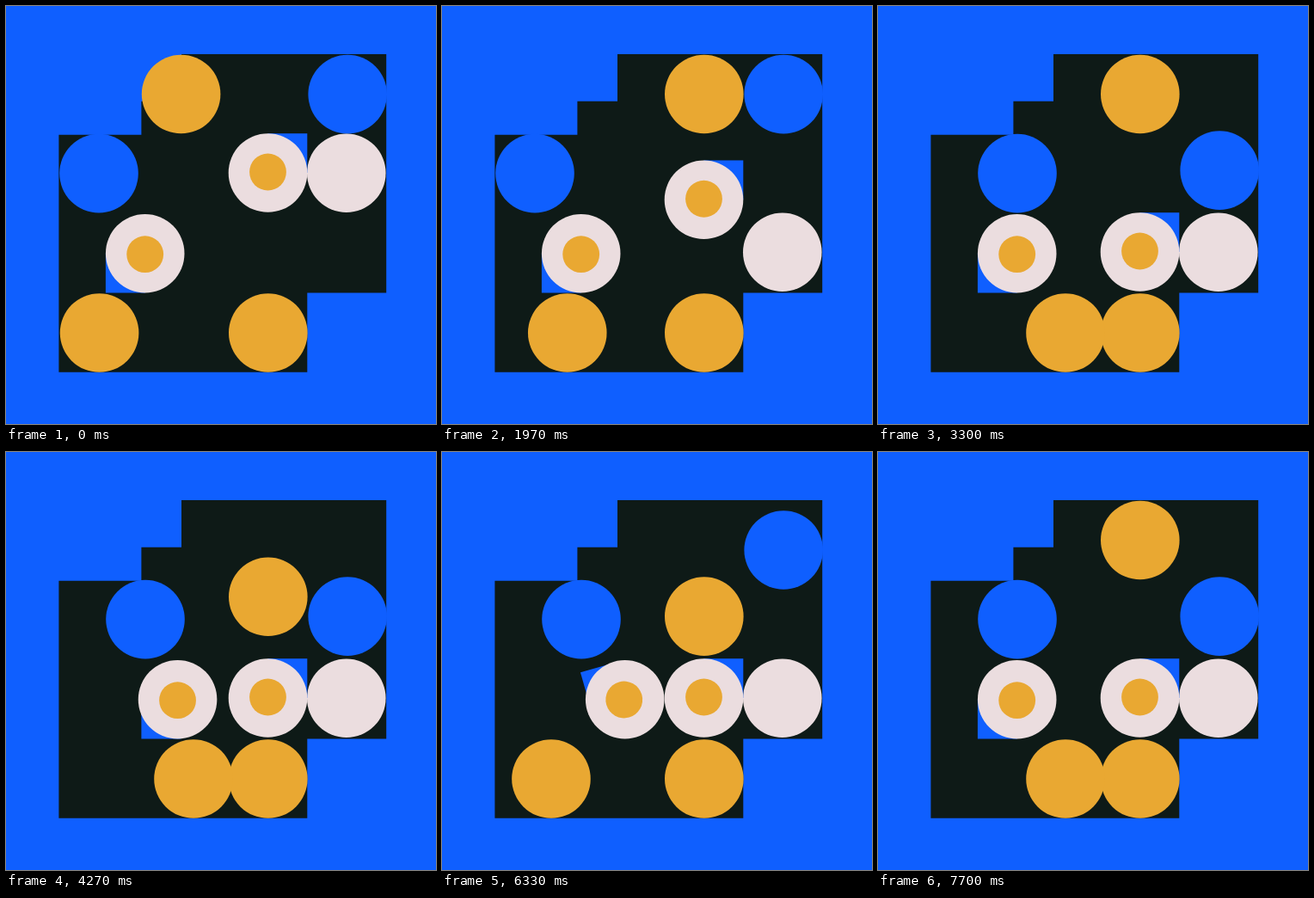
An HTML page with a canvas that plays this animation: 500x486 px, repeating every 8 s.

```html
<!DOCTYPE html>
<html lang="en">
<head>
<meta charset="utf-8">
<title>Sliding circles</title>
<style>
  html, body { margin: 0; width: 100%; height: 100%; overflow: hidden; background: #0f5fff; }
  canvas { display: block; }
</style>
</head>
<body>
<canvas id="stage" width="500" height="486"></canvas>
<script>
const ctx = document.getElementById('stage').getContext('2d');
const BLUE = '#0f5fff', DARK = '#0e1a17', YELLOW = '#e9a832', PALE = '#ebdddf';
const LOOP = 8000, FIRST_MOVE = 830, MOVE_GAP = 1100, STEPS = 9;
const RADIUS = 45.8, YOLK = 21.4;

// cubic-bezier(0, 0, .58, 1), solved by bisection
function easeOut(x) {
  let low = 0, high = 1;
  for (let i = 0; i < 30; i++) {
    const mid = (low + high) / 2;
    if (1.74 * mid ** 2 - 0.74 * mid ** 3 < x) low = mid; else high = mid;
  }
  return 3 * low ** 2 - 2 * low ** 3;
}

// Eased progress of move n, stepped at 30 frames a second on a 10 ms clock
function progress(n, time) {
  const elapsed = time - FIRST_MOVE - n * MOVE_GAP;
  if (elapsed < 0) return 0;
  const step = Math.floor(3 * Math.floor(elapsed / 10) / 10) + 1;
  return step >= STEPS ? 1 : easeOut(step / STEPS);
}

function circle(x, y, color, radius = RADIUS) {
  ctx.fillStyle = color;
  ctx.beginPath();
  ctx.arc(x, y, radius, 0, 2 * Math.PI);
  ctx.fill();
}

function board() {
  ctx.fillStyle = BLUE;
  ctx.fillRect(0, 0, 500, 486);
  ctx.fillStyle = DARK;
  ctx.beginPath();
  [[204, 56], [442.2, 56], [442.2, 333.6], [350.3, 333.6], [350.3, 425.8],
   [61.4, 425.8], [61.4, 149.8], [157.4, 149.8], [157.4, 110.7], [204, 110.7]]
    .forEach(([x, y]) => ctx.lineTo(x, y));
  ctx.fill();
}

// A disc with a yolk and one blue corner; side is -1 for lower left, 1 for upper right
function egg(x, y, side, turn = 0, cornerShift = 0) {
  ctx.save();
  ctx.translate(x + cornerShift, y);
  ctx.rotate(turn);
  ctx.fillStyle = BLUE;
  ctx.fillRect(0, 0, side * RADIUS, -side * RADIUS);
  ctx.restore();

  circle(x, y, PALE);
  ctx.save();
  ctx.translate(x, y);
  ctx.rotate(turn);
  circle(0, -side, YELLOW, YOLK);
  ctx.restore();
}

function draw(time) {
  const [p1, p2, p3, p4, p5, p6, p7] = Array.from({ length: 7 }, (_, n) => progress(n, time));
  const drop = p4 - p7;
  const swing = p5 - p6;

  board();
  circle(108 + 54 * p3, 194.6, BLUE);
  circle(397.2, 102.6 + 88.5 * p3 - 93.8 * swing, BLUE);
  circle(203.6 + 101.2 * p1, 102.5 + 88.6 * drop, YELLOW);
  circle(395.8, 194.2 + 92 * p1, PALE);
  circle(304.8, 380, YELLOW);
  circle(108.6 + 109.4 * p2 - 110.7 * swing, 380, YELLOW);
  egg(304.5, 194 + 92 * p2, 1);
  egg(161.7 + 51 * drop, 287.7, -1, swing * Math.PI / 2, 4.9 * drop);
}

function frame() {
  draw(performance.now() % LOOP);
  requestAnimationFrame(frame);
}
frame();
</script>
</body>
</html>
```
